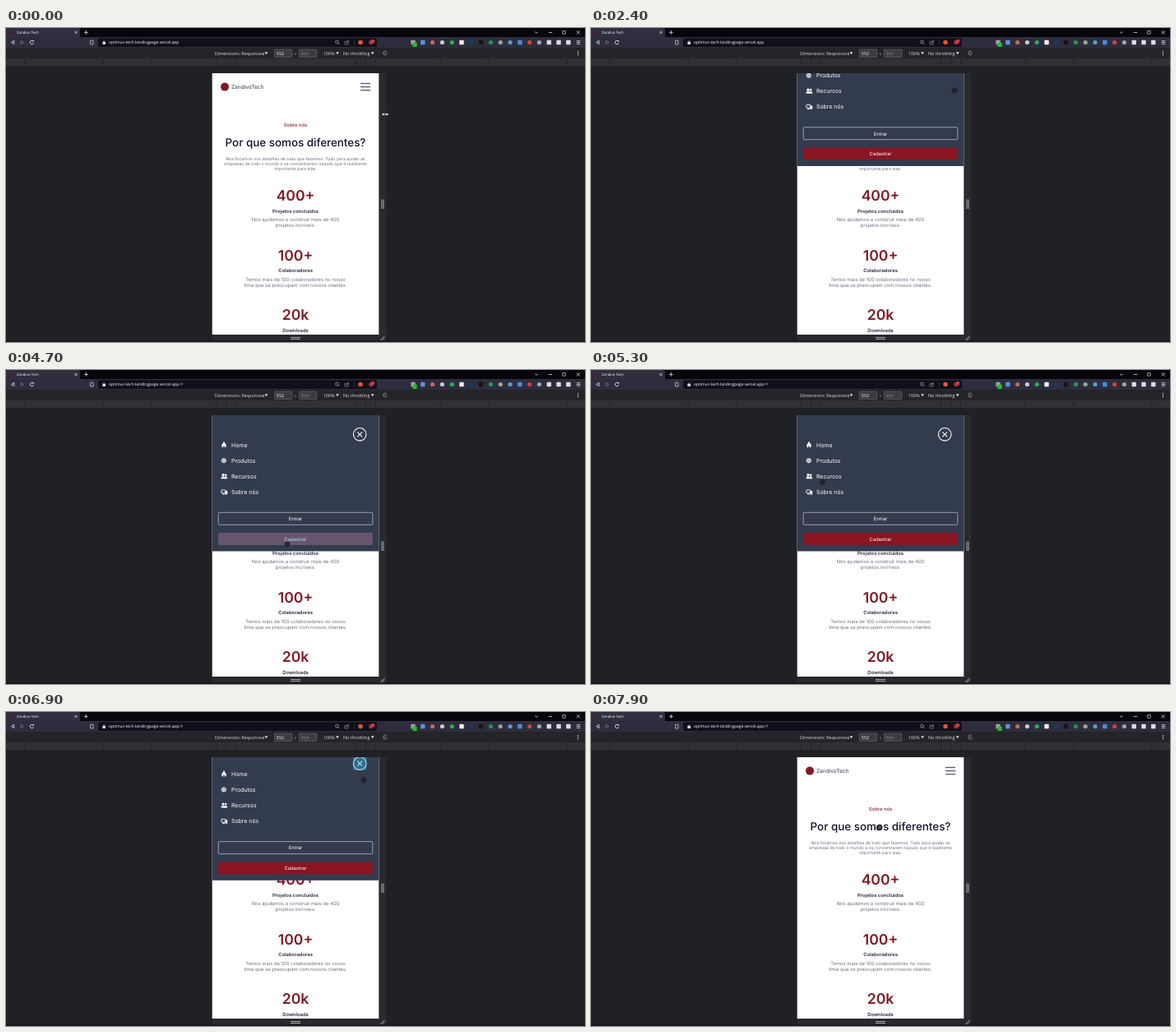
Recreate the animation shown at these times as an HTML page with a canvas. Size 704 by 382 pixels, loop 8000 ms.

```html
<!DOCTYPE html>
<html lang="pt">
<head>
<meta charset="utf-8">
<title>Zandivo Tech</title>
<style>
  html, body { margin: 0; width: 100%; height: 100%; overflow: hidden; background: #202124; }
  canvas { display: block; width: 704px; height: 382px; }
</style>
</head>
<body>
<canvas id="stage" width="704" height="382"></canvas>
<script>
const ctx = document.getElementById('stage').getContext('2d');
ctx.textRendering = 'geometricPrecision';

const LOOP = 8000, STEP = 100, WIDTH = 704, MIDDLE = 352;
const UI = '"Open Sans", sans-serif', PAGE = 'Inter, sans-serif';
const RED = '#801a25', BUTTON = '#8a1521', SLATE = '#333b4e', GREY = '#6c7080';
const LIGHT = '#e2e2e7', DIM = '#777580', TAP = 'rgba(51,181,229,.4)';
const page = { x: 250.7, y: 55, w: 202.6, h: 318 };
const MENU_HEIGHT = 165.5;

// Pointer stops: time, x, y
const stops = [
  [1300, 461, 105], [1800, 442, 76], [2700, 442, 76], [3300, 291, 92],
  [3900, 347, 202], [4700, 342, 212], [5400, 278, 132], [6100, 290, 95],
  [6400, 460, 88], [6700, 436, 67], [6900, 435, 83], [7900, 350, 141]
];

function rect(x, y, w, h, color) {
  ctx.fillStyle = color;
  ctx.fillRect(x, y, w, h);
}
function box(x, y, w, h, r, fill, stroke, width = 0.7) {
  ctx.beginPath();
  ctx.roundRect(x, y, w, h, r);
  if (fill) { ctx.fillStyle = fill; ctx.fill(); }
  if (stroke) { ctx.strokeStyle = stroke; ctx.lineWidth = width; ctx.stroke(); }
}
function square(x, y, r, fill, stroke, width) {
  box(x - r, y - r, 2 * r, 2 * r, r / 4, fill, stroke, width);
}
function dot(x, y, r, color) {
  ctx.beginPath();
  ctx.arc(x, y, r, 0, 7);
  ctx.fillStyle = color;
  ctx.fill();
}
function ring(x, y, r, color, width = 0.8, from = 0, to = 2 * Math.PI) {
  ctx.beginPath();
  ctx.arc(x, y, r, from, to);
  ctx.strokeStyle = color;
  ctx.lineWidth = width;
  ctx.stroke();
}
function line(x0, y0, x1, y1, color, width = 0.8) {
  ctx.beginPath();
  ctx.moveTo(x0, y0);
  ctx.lineTo(x1, y1);
  ctx.strokeStyle = color;
  ctx.lineWidth = width;
  ctx.stroke();
}
function cross(x, y, r, color, width) {
  line(x - r, y - r, x + r, y + r, color, width);
  line(x + r, y - r, x - r, y + r, color, width);
}
function bars(x, y, w, gap, color, width) {
  for (const k of [-1, 0, 1]) line(x - w / 2, y + k * gap, x + w / 2, y + k * gap, color, width);
}
// A triangle pointing along the given number of quarter turns
function triangle(x, y, r, turns, color, outline) {
  ctx.save();
  ctx.translate(x, y);
  ctx.rotate(turns * Math.PI / 2);
  ctx.beginPath();
  ctx.moveTo(r, 0);
  ctx.lineTo(-r * 0.7, -r);
  ctx.lineTo(-r * 0.7, r);
  ctx.closePath();
  ctx.lineWidth = 0.8;
  ctx.fillStyle = ctx.strokeStyle = color;
  if (outline) ctx.stroke(); else ctx.fill();
  ctx.restore();
}
function text(str, x, y, size, color, family = UI, weight = 400, align = 'left') {
  ctx.font = `${weight} ${size}px ${family}`;
  ctx.textAlign = align;
  ctx.fillStyle = color;
  ctx.fillText(str, x, y);
  return ctx.measureText(str).width;
}
function centered(str, y, size, color, weight = 400) {
  text(str, MIDDLE, y, size, color, PAGE, weight, 'center');
}

// The CSS "ease" curve: cubic-bezier(.25, .1, .25, 1)
function ease(p) {
  if (p <= 0) return 0;
  if (p >= 1) return 1;
  const bezier = (u, a, b) => 3 * u * (1 - u) ** 2 * a + 3 * u * u * (1 - u) * b + u ** 3;
  let low = 0, high = 1;
  for (let i = 0; i < 24; i++) {
    const mid = (low + high) / 2;
    if (bezier(mid, 0.25, 0.25) < p) low = mid; else high = mid;
  }
  return bezier(low, 0.1, 1);
}

function pointerAt(t) {
  const next = stops.findIndex(stop => stop[0] >= t);
  if (next <= 0) return stops[0].slice(1);
  const [t0, x0, y0] = stops[next - 1], [t1, x1, y1] = stops[next];
  const p = (t - t0) / (t1 - t0), s = p * p * (3 - 2 * p);
  return [x0 + (x1 - x0) * s, y0 + (y1 - y0) * s];
}

function drawTabs() {
  const y = 5.4;
  rect(0, 0, WIDTH, 11, '#07060c');
  box(0, 0, 90, 12, [0, 2, 0, 0], '#302f40');
  dot(5, y, 2, '#5a1722');
  text('Zandivo Tech', 13, 7.2, 4.4, '#fff', UI, 500);
  cross(85, y, 1.5, LIGHT, 0.8);
  line(95, y, 99.8, y, LIGHT);
  line(97.4, y - 2.4, 97.4, y + 2.4, LIGHT);
  line(643.2, y - 0.8, 645, y + 1, LIGHT);
  line(645, y + 1, 646.8, y - 0.8, LIGHT);
  line(659.8, y, 664.2, y, LIGHT);
  square(678.4, y, 1.8, null, LIGHT);
  cross(695.8, y, 2, LIGHT, 0.8);
}

function drawExtensions() {
  const y = 17.5, pitch = 11.8;
  const icons = {
    square: '#9da2a8 #5b91dc #f0f0f0 #15151a #438ee0 #dcdce2 #dcdce2 #dcdce2'.split(' '),
    circle: '#c56a5c #c8c8d0 #25b34f #163c67 #1d9850 #9aa58f #5a9bd5 #d6403c #a4a4ac'.split(' ')
  };
  [...'sscccscscccsccsss'].forEach((kind, i) => {
    const x = 495 + i * pitch;
    if (kind === 's') square(x, y, 2.7, icons.square.shift());
    else dot(x, y, 2.6, icons.circle.shift());
  });
  square(497, 20.3, 2.6, '#21c02b');
  bars(696, y, 4.4, 1.8, LIGHT, 0.8);
  dot(431, y, 2.8, '#e8532b');
  dot(444, y, 2.8, '#b62a3c');
  square(446, 16, 2, '#d43a40');
}

function drawAddressBar(hasHash) {
  const y = 17.5;
  rect(0, 11, WIDTH, 13, '#2e2d3d');
  triangle(8.4, y, 2.1, 2, LIGHT, true);
  triangle(19.6, y, 2.1, 0, DIM, true);
  ring(31.5, y, 2.2, LIGHT, 0.9, 0.3, 5.5);
  triangle(33.3, 16, 1.2, 1, LIGHT);
  box(102.6, 15.2, 3.4, 4.8, 0.4, null, LIGHT);
  box(112, 12.2, 339, 10.8, 2, '#11101a');
  rect(117.4, 17, 3.6, 2.9, LIGHT);
  ring(119.2, 17, 1.2, LIGHT, 0.6, Math.PI, 2 * Math.PI);
  const width = text('optimus-tech-landingpage.vercel.app', 125, 19.2, 4.95, '#fff');
  if (hasHash) text('/#', 125 + width, 19.2, 4.95, '#a2a1aa');
  ring(402.5, 17, 1.9, '#b3b3ba', 0.7);
  line(403.9, 18.4, 405.4, 19.9, '#b3b3ba');
  box(411.8, 16.4, 4.4, 3.6, 0.4, null, '#9c9ca4', 0.6);
  line(413.5, 18.4, 417, 15, '#b3b3ba');
  line(423.5, 14.5, 423.5, 20.5, '#3d3b49', 0.6);
  drawExtensions();
}

function sizeField(x, value, color) {
  box(x, 26.2, 21.4, 9.2, 0.8, '#3b3c40', '#707175', 0.6);
  text(value, x + 2.4, 32.7, 5.4, color);
}

function drawDevice() {
  const y = 32.7;
  rect(0, 24, WIDTH, 13, '#242528');
  text('Dimensions: Responsive', 254, y, 5.35, LIGHT);
  text('x', 350.5, y, 5, '#919296');
  sizeField(326.4, '552', '#fff');
  sizeField(356.4, '864', '#85868a');
  text('100%', 386, y, 5.35, LIGHT);
  text('No throttling', 410, y, 5.45, LIGHT);
  for (const x of [316.5, 403, 445.7]) triangle(x, 30.4, 1.8, 1, LIGHT);
  ring(461, 30.5, 2.6, DIM, 0.8, 0.4, 5.6);
  square(461, 30.5, 1.4, null, DIM);
  for (const k of [-2, 0, 2]) dot(695.5, 30.7 + k, 0.65, LIGHT);

  // Media query strip: breakpoints mirrored around the middle
  rect(0, 37, WIDTH, 9, '#303134');
  for (const breakpoint of [400, 464, 530, 960, 1280, 1800])
    for (const side of [-1, 1]) rect(MIDDLE + side * breakpoint * 0.183, 38, 0.9, 7.5, '#202124');

  rect(0, 46, WIDTH, 336, '#202124');
  rect(453, page.y, 9.5, 325, '#292a2d');
  rect(251, 373, 211, 7.5, '#292a2d');
  for (const k of [0, 2]) {
    rect(456.5 + k, 208.5, 0.9, 11.5, '#b5b6b9');
    rect(346, 376 + k, 12, 0.9, '#b5b6b9');
    line(455 + k, 380, 460.5, 374.5 + k, '#b5b6b9');
  }
  rect(0, 380.7, WIDTH, 1.3, '#17111b');
}

function drawStat(index, value, title, lines) {
  const y = index * 72.3;
  centered(value, 210.2 + y, 17.57, RED, 600);
  centered(title, 224.9 + y, 5.86, '#23253a', 600);
  lines.forEach((str, i) => centered(str, 235.2 + y + i * 7.2, 5.86, GREY));
}

function drawPage() {
  rect(page.x, page.y, page.w, page.h, '#fff');
  dot(266, 71.6, 5, RED);
  text('ZandivoTech', 274, 74.1, 6.55, '#33364a', PAGE);
  bars(437, 71.6, 12, 4.1, '#555a70', 1.3);
  centered('Sobre nós', 120.1, 5.86, RED, 500);
  centered('Por que somos diferentes?', 143.6, 13.4, '#12142b', 500);
  ['Nós focamos nos detalhes de tudo que fazemos. Tudo para ajudar as',
   'empresas de todo o mundo a se concentrarem naquilo que é realmente',
   'importante para elas.'
  ].forEach((str, i) => centered(str, 161 + i * 6.2, 5.16, GREY));
  drawStat(0, '400+', 'Projetos concluídos',
    ['Nós ajudamos a construir mais de 400', 'projetos incríveis.']);
  drawStat(1, '100+', 'Colaboradores',
    ['Temos mais de 100 colaboradores no nosso', 'time que se preocupam com nossos clientes.']);
  drawStat(2, '20k', 'Downloads', []);
}

const menuItems = [
  ['Home', y => {
    triangle(265, y - 1.2, 3.2, 3, '#fff');
    rect(262.6, y, 1.7, 3, '#fff');
    rect(265.7, y, 1.7, 3, '#fff');
  }],
  ['Produtos', y => {
    dot(264.8, y, 3, '#fff');
    for (const k of [-1.1, 1.1]) {
      line(261.8, y + k, 267.8, y + k, SLATE, 0.4);
      line(264.8 + k, y - 3, 264.8 + k, y + 3, SLATE, 0.4);
    }
  }],
  ['Recursos', y => {
    for (const [x, r] of [[267.2, 1.3], [264, 1.6]]) {
      dot(x, y - 1.6, r, '#fff');
      box(x - r * 1.5, y + 0.3, r * 3, 2.7, [1.5, 1.5, 0, 0], '#fff');
    }
  }],
  ['Sobre nós', y => {
    box(261.9, y - 2.4, 5, 3.7, 0.5, null, '#fff', 0.9);
    line(263, y + 2.7, 266, y + 2.7, '#fff', 0.9);
    box(266.5, y - 1.4, 2.7, 4.4, 0.5, '#fff');
  }]
];

function drawMenu(open, t) {
  ctx.save();
  ctx.beginPath();
  ctx.rect(page.x, page.y, page.w, page.h);
  ctx.clip();
  ctx.translate(0, (open - 1) * MENU_HEIGHT);
  rect(page.x, page.y, page.w, MENU_HEIGHT, SLATE);
  ring(430.2, 78.3, 7.8, '#fff', 1.1);
  cross(430.2, 78.3, 3, '#fff', 1.1);
  if (t >= 6900 && t < 7000) square(430.2, 78.3, 8.5, TAP);
  menuItems.forEach(([label, icon], i) => {
    const y = 91.1 + i * 19.1;
    icon(y);
    text(label, 274, y + 2.5, 6.95, '#fff', PAGE);
  });
  box(258.2, 173.3, 187.6, 15, 1.5, null, '#d3d6dd', 0.65);
  centered('Entrar', 183.1, 5.86, '#fff');
  box(258.2, 198.1, 187.6, 14.8, 1, BUTTON);
  centered('Cadastrar', 207.6, 5.86, '#fff');
  if (t >= 4400 && t < 4900) box(258.2, 198.1, 187.6, 14.8, 1, TAP);
  ctx.restore();
}

function drawPointer(t) {
  const [x, y] = pointerAt(t);
  if (x < page.x + page.w) {
    dot(x, y, 3.4, 'rgba(28,30,36,.75)');
    return;
  }
  line(x - 3, y, x + 3, y, '#fff');
  triangle(x - 2.6, y, 1.6, 2, '#fff');
  triangle(x + 2.6, y, 1.6, 0, '#fff');
}

function frame(now) {
  const t = Math.floor((now % LOOP) / STEP) * STEP;
  const open = ease((t - 2200) / 500) - ease((t - 6850) / 500);
  drawDevice();
  drawTabs();
  drawAddressBar(t >= 4500);
  drawPage();
  if (open > 0) drawMenu(open, t);
  drawPointer(t);
  requestAnimationFrame(frame);
}
requestAnimationFrame(frame);
</script>
</body>
</html>
```
